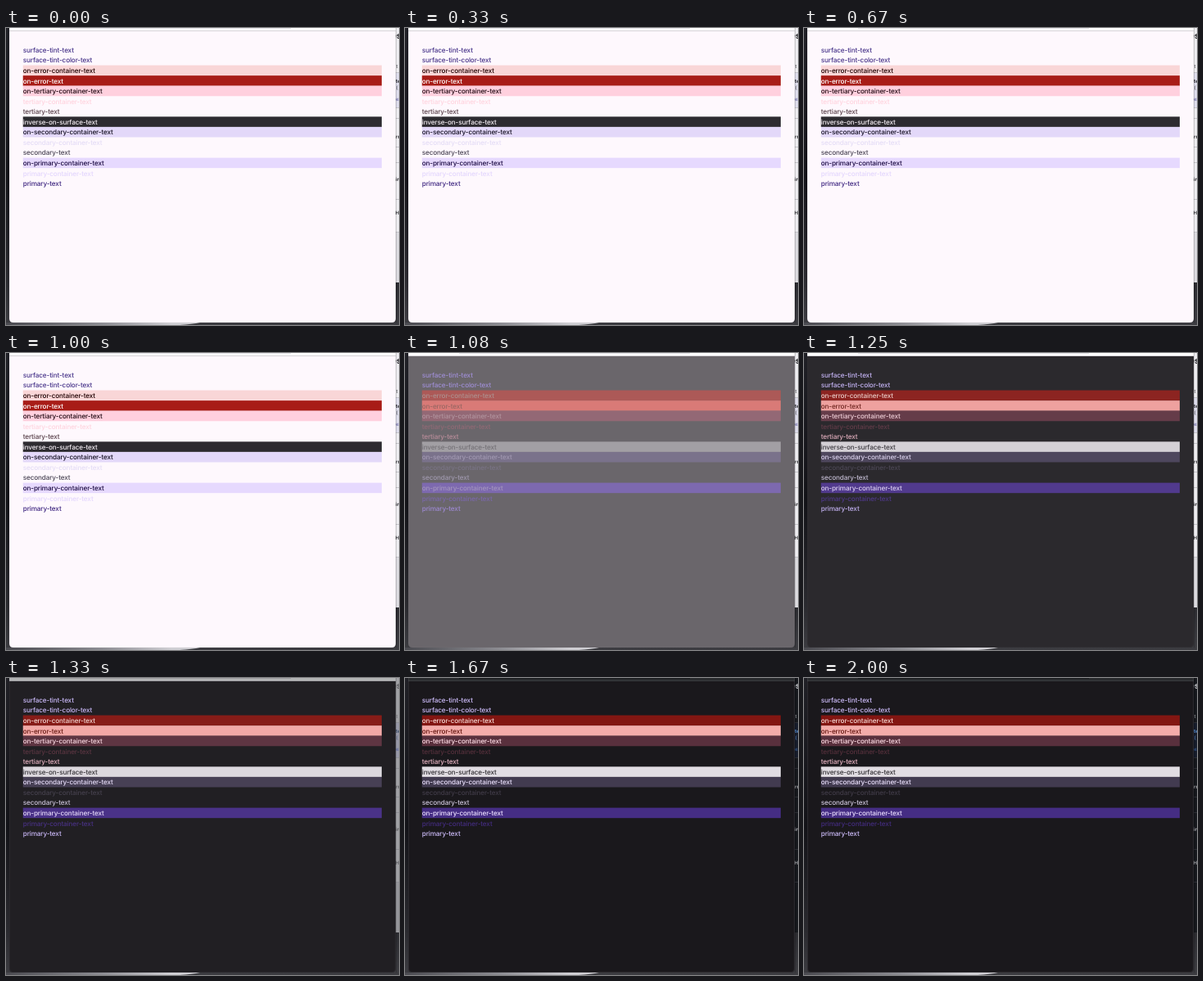
These frames come from a looping animation (480 px wide and 363 px high, 2080 ms). An HTML page:

```html
<!DOCTYPE html>
<html lang="en">
<head>
<meta charset="utf-8">
<title>Colour roles, light to dark</title>
<style>
html, body { margin: 0; width: 100%; height: 100%; overflow: hidden; background: #17171b; }
svg { position: absolute; left: 0; top: 0; }
text { font-family: Inter, Roboto, sans-serif; text-rendering: geometricPrecision; }
#rows text { font-size: 8.2px; font-weight: 500; letter-spacing: -.15px; }
</style>
</head>
<body>
<svg width="480" height="363" viewBox="0 0 480 363">
  <defs>
    <linearGradient id="desk" x1="0" y1="0" x2="0" y2="1">
      <stop offset="0" stop-color="#202026"/>
      <stop offset=".5" stop-color="#131318"/>
      <stop offset=".85" stop-color="#2a2a2f"/>
      <stop offset="1" stop-color="#3c3c41"/>
    </linearGradient>
    <linearGradient id="swoosh">
      <stop offset="0" stop-color="#4a4a50"/>
      <stop offset=".5" stop-color="#8e8e94"/>
      <stop offset=".85" stop-color="#cfced3"/>
    </linearGradient>
    <clipPath id="frame"><path d="M4 0H476V355Q476 360 471 360H9Q4 360 4 355Z"/></clipPath>
  </defs>
  <rect width="480" height="363" fill="url(#desk)"/>
  <path d="M0 360H237Q228 362 212 363H0Z" fill="url(#swoosh)"/>
  <g id="page"></g>
  <rect x="476" width="1" height="360" fill="#000" opacity=".18"/>
  <g clip-path="url(#frame)">
    <rect id="body" x="4" width="472" height="360"/>
    <rect id="bar" x="4" width="472" height="3"/>
    <rect id="field" x="66" width="282" height="1"/>
    <rect id="line" x="4" y="3" width="472" height="1"/>
  </g>
  <path id="edge" d="M4.5 0V355Q4.5 359.5 9 359.5H471Q475.5 359.5 475.5 355V0" fill="none" stroke="#8a8a90"/>
  <g id="rows"></g>
</svg>
<script>
const LOOP = 2080;
// Held values: [time in ms, progress from light to dark]
const FADE = [[0, 0], [1080, .65], [1170, .82], [1250, .925], [1330, .97], [1420, 1]];
const SYSTEM = [[0, 0], [1330, .35], [1420, .8], [1500, 1]];

// name, text light/dark, fill light/dark
const ROLES = [
  ['surface-tint', '#48358a', '#cdbcfa'],
  ['surface-tint-color', '#48358a', '#cdbcfa'],
  ['on-error-container', '#210304', '#f9dad6', '#f9d6d7', '#831612'],
  ['on-error', '#ffffff', '#64150f', '#a81c17', '#f4acaa'],
  ['on-tertiary-container', '#210a14', '#ffdde6', '#ffd0de', '#59303d'],
  ['tertiary-container', '#ffd3de', '#55303c'],
  ['tertiary', '#573f48', '#eab6c5'],
  ['inverse-on-surface', '#f5eff5', '#302e33', '#2d2b30', '#e1dde3'],
  ['on-secondary-container', '#181325', '#eae0fc', '#e3d8f9', '#423b50'],
  ['secondary-container', '#e4dcf6', '#403b48'],
  ['secondary', '#4c4757', '#ccc4db'],
  ['on-primary-container', '#1c0b42', '#ebdfff', '#e6d9fe', '#452d84'],
  ['primary-container', '#e3d6fd', '#432c7e'],
  ['primary', '#3e2680', '#cebdfb'],
];
const LEFT = 20.75, RIGHT = 458.9, TOP = 20.45, ROW = 12.56, BASELINE = 9.4;

const $ = id => document.getElementById(id);
const rgb = hex => [1, 3, 5].map(i => parseInt(hex.slice(i, i + 2), 16));
const mix = (a, b, p) => {
  const to = rgb(b);
  return `rgb(${rgb(a).map((v, i) => Math.round(v + (to[i] - v) * p))})`;
};
const held = (steps, t) => steps.reduce((v, s) => t >= s[0] ? s[1] : v, 0);

// Each entry: element, light colour, dark colour
const content = [[$('body'), '#fef8fd', '#1a181c']];
const system = [
  [$('bar'), '#ffffff', '#292b2e'],
  [$('field'), '#e6e5e9', '#17191c'],
  [$('line'), '#d6d3d8', '#393b3f'],
];

function add(parent, tag, attrs, text = '') {
  const el = document.createElementNS('http://www.w3.org/2000/svg', tag);
  for (const k in attrs) el.setAttribute(k, attrs[k]);
  el.textContent = text;
  $(parent).append(el);
  return el;
}
function block(y, height, light, dark) {
  system.push([add('page', 'rect', { x: 476, y, width: 4, height }), light, dark]);
}
function label(text, x, y, size, weight, light, dark) {
  const attrs = { x, y, 'font-size': size, 'font-weight': weight };
  system.push([add('page', 'text', attrs, text), light, dark]);
}

block(0, 311, '#eeedf1', '#15171c');
block(55, 42, '#deddec', '#161c2b');
block(250, 61, '#dcdbe0', '#15171c');
for (const y of [54, 97, 110, 145, 164, 209, 249]) block(y, 1, '#c6c5cb', '#2b2d33');
label('es', 470.8, 13, 10.5, 700, '#202024', '#c8c9cd');
label('t', 476.5, 49, 6, 400, '#45454a', '#a5a6aa');
label('te', 476, 67, 6, 700, '#242428', '#5c93d8');
label('(', 476.5, 75, 6, 400, '#38383e', '#5c93d8');
label('ex', 476, 89, 6, 400, '#5b5999', '#3c639e');
label('rr', 476, 135, 6, 600, '#242428', '#b3b4b8');
label('in', 476, 187, 6, 600, '#242428', '#b3b4b8');
label('Ho', 475.5, 227.5, 6, 600, '#242428', '#b3b4b8');

ROLES.forEach(([name, light, dark, fill, darkFill], i) => {
  const y = TOP + ROW * i;
  if (fill) {
    const strip = add('rows', 'rect', { x: LEFT, y, width: RIGHT - LEFT, height: ROW });
    content.push([strip, fill, darkFill]);
  }
  content.push([add('rows', 'text', { x: LEFT, y: y + BASELINE }, name + '-text'), light, dark]);
});

function paint(parts, p) {
  for (const [el, light, dark] of parts) el.setAttribute('fill', mix(light, dark, p));
}
function draw(t) {
  const s = held(SYSTEM, t);
  paint(content, held(FADE, t));
  paint(system, s);
  $('edge').setAttribute('opacity', .05 + .12 * s);
}

const start = performance.now();
function tick() {
  draw((performance.now() - start) % LOOP);
  requestAnimationFrame(tick);
}
tick();
</script>
</body>
</html>
```
